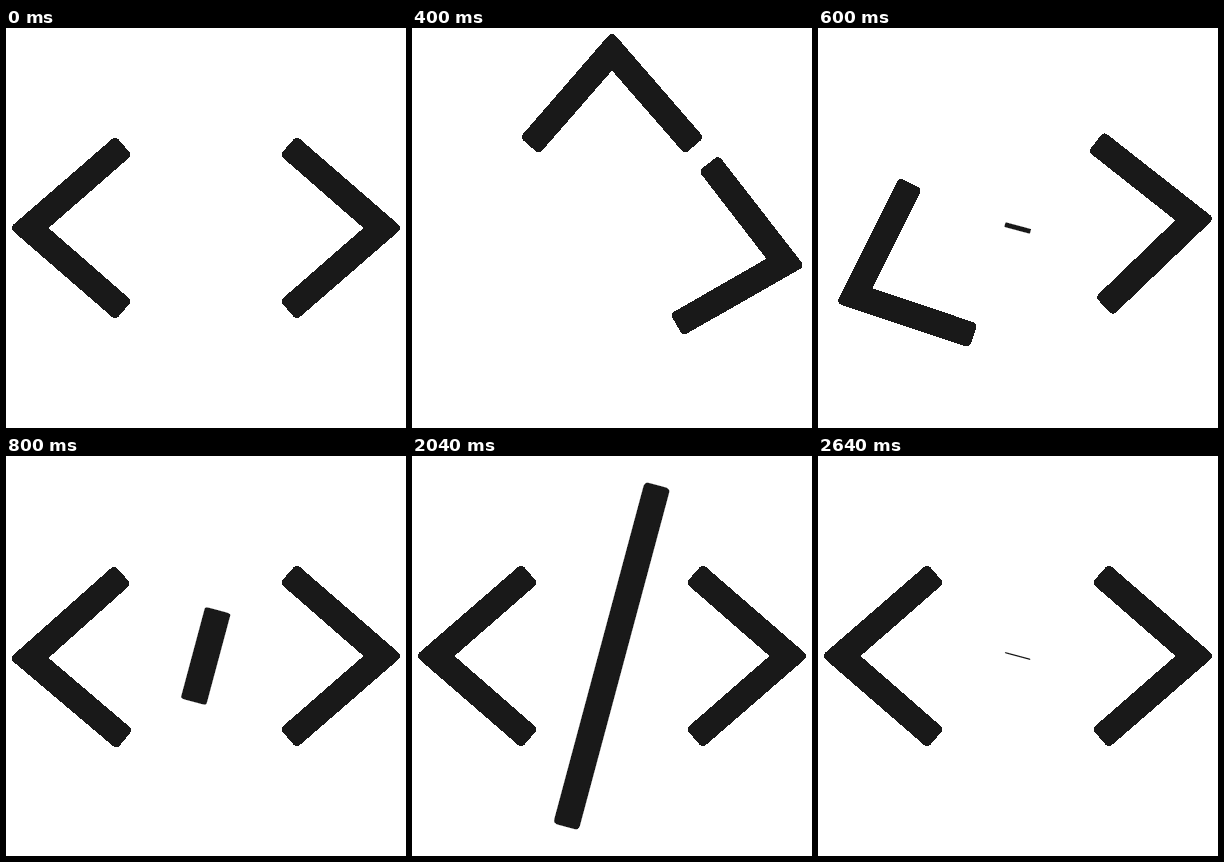
An HTML page that plays this animation: 400 px wide and 400 px high, repeating every 2680 ms.

```html
<!DOCTYPE html>
<html lang="en">
<head>
<meta charset="utf-8">
<title>Code icon</title>
<style>
  html, body { margin: 0; width: 100%; height: 100%; overflow: hidden; background: #fff; }
  svg { display: block; width: 100%; height: 100%; }
  .ink { fill: #191919; stroke: #191919; stroke-width: 8.8; stroke-linejoin: round; shape-rendering: crispEdges; }
  #slash { stroke-width: 0.8; vector-effect: non-scaling-stroke; }
</style>
</head>
<body>
<svg viewBox="0 0 400 400">
  <defs>
    <path id="bracket" d="M10.2 200 L109.1 114.2 L119.9 126.7 L35.9 200 L119.9 273.3 L109.1 285.8 Z"/>
  </defs>
  <use id="left" class="ink" href="#bracket"/>
  <use id="right" class="ink" href="#bracket"/>
  <rect id="slash" class="ink" x="-12.8" y="-176.6" width="25.6" height="353.2" rx="4"/>
</svg>
<script>
  const LOOP = 2680;
  const STEP = 40; // the animation runs at 25 pictures per second
  const SLACK = 4; // tolerates a clock that ticks slightly early
  const [left, right, slash] = ['left', 'right', 'slash'].map(id => document.getElementById(id));

  function easeInOutExpo(p) {
    if (p <= 0) return 0;
    if (p >= 1) return 1;
    return p < 0.5 ? 2 ** (20 * p - 10) / 2 : 1 - 2 ** (10 - 20 * p) / 2;
  }

  const tween = (t, start, length) => easeInOutExpo((t - start) / length);
  const turn = (el, deg) => el.setAttribute('transform', `rotate(${deg} 200 200)`);

  function draw(now) {
    const t = Math.floor((now + SLACK) / STEP) * STEP % LOOP;
    // The brackets swap sides, the second one trailing the first.
    turn(left, 180 * tween(t, 0, 800));
    turn(right, 180 + 180 * tween(t, 120, 800));

    const size = tween(t, 400, 880) - tween(t, 2000, 680);
    slash.setAttribute('visibility', size > 0 ? 'visible' : 'hidden');
    slash.setAttribute('transform', `translate(199.7 200) rotate(15) scale(1 ${size})`);
  }

  function tick(now) {
    draw(now);
    requestAnimationFrame(tick);
  }

  draw(0);
  requestAnimationFrame(tick);
</script>
</body>
</html>
```
